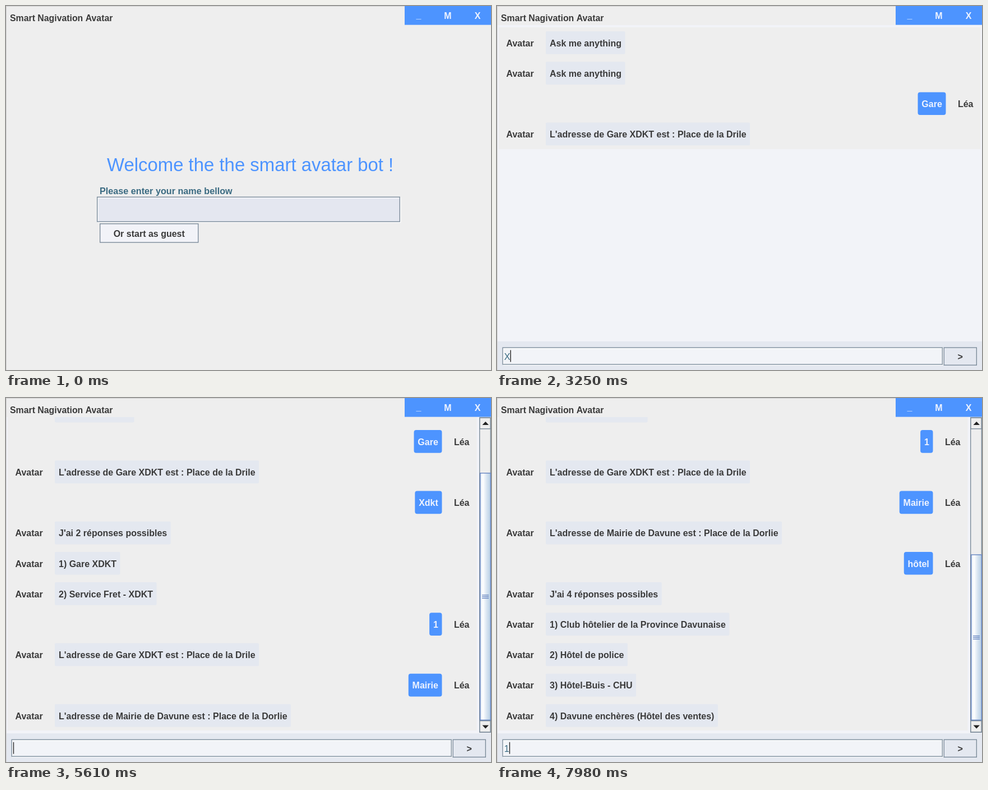
These frames come from a looping animation (865x648 px, 8 s). An HTML page with a canvas:

```html
<!DOCTYPE html>
<html lang="fr">
<head>
<meta charset="utf-8">
<title>Smart Nagivation Avatar</title>
<style>
  html, body { margin: 0; width: 100%; height: 100%; overflow: hidden; background: #eee; }
  canvas { display: block; }
</style>
</head>
<body>
<canvas id="stage" width="865" height="648"></canvas>
<script>
const ctx = document.getElementById('stage').getContext('2d');
const LOOP = 8000, ROW = 54.2, PX = 1.36;
const FONT = '"Liberation Sans", Arial, sans-serif';
const BOLD = 'bold 16px ' + FONT, PLAIN = '16.26px ' + FONT;
const BLUE = '#4d94ff', GREY = '#eee', PALE = '#f2f3f8', MIST = '#e4e8f0';
const EDGE = '#7a8a99', INK = '#3a3a3a', TEAL = '#3b6b82';

const USER = 'Léa';
const STATION = "L'adresse de Gare XDKT est : Place de la Drile";
// A leading ">" marks a message written by the user.
const chat = [
  'Ask me anything', 'Ask me anything',
  '>Gare', STATION,
  '>Xdkt', "J'ai 2 réponses possibles", '1) Gare XDKT', '2) Service Fret - XDKT',
  '>1', STATION,
  '>Mairie', "L'adresse de Mairie de Davune est : Place de la Dorlie",
  '>hôtel', "J'ai 4 réponses possibles",
  '1) Club hôtelier de la Province Davunaise', '2) Hôtel de police',
  '3) Hôtel-Buis - CHU', '4) Davune enchères (Hôtel des ventes)'
];

// Number of visible messages from each time on; 0 is the welcome screen.
const counts = { 0: 0, 820: 2, 2270: 4, 3530: 8, 4750: 10, 5610: 12, 6500: 18 };

// Content of the active field; "|" is the visible caret.
const typing = {
  0: '', 430: '|', 540: '', 600: '|', 650: 'L|', 710: 'Lé|', 760: 'Léa|',
  820: '', 1280: '|', 1410: '', 1550: '|', 1660: '', 1800: '|', 1910: '',
  1960: 'G|', 2020: 'Ga|', 2080: 'Gar|', 2190: 'Gare|',
  2270: '|', 2380: '', 2520: '|', 2660: '', 2770: '|', 2910: '',
  2970: 'X|', 3110: 'X', 3250: 'X|', 3310: 'Xd|', 3370: 'Xdk|', 3420: 'Xdkt|',
  3530: '|', 3670: '', 3780: '|', 3950: '', 4060: '|', 4200: '', 4310: '|',
  4450: '', 4560: '|', 4640: '1|',
  4750: '|', 4890: '', 5000: '|', 5140: '', 5200: '|',
  5250: 'M|', 5310: 'Ma|', 5360: 'Mai|', 5420: 'Mair|', 5470: 'Mairi|', 5530: 'Mairie|',
  5610: '|', 5720: '', 5860: '|', 5970: '',
  6030: 'h|', 6090: 'hô|', 6140: 'hôt|', 6200: 'hôte|', 6280: 'hôtel|', 6420: 'hôtel',
  6500: '|', 6620: '', 6750: '|', 6870: '', 6980: '|', 7090: '', 7230: '|',
  7340: '', 7480: '|', 7590: '', 7730: '|', 7870: '', 7980: '1|'
};

function at(track, t) {
  let value;
  for (const key in track) if (+key <= t) value = track[key];
  return value;
}

function fill(x, y, w, h, color) {
  ctx.fillStyle = color;
  ctx.fillRect(x, y, w, h);
}

function frame(x, y, w, h, color) {
  ctx.strokeStyle = color;
  ctx.lineWidth = PX;
  ctx.strokeRect(x + PX / 2, y + PX / 2, w - PX, h - PX);
}

function round(x, y, w, h, r, color) {
  ctx.fillStyle = color;
  ctx.beginPath();
  ctx.roundRect(x, y, w, h, r);
  ctx.fill();
}

function text(str, x, y, color = INK, font = BOLD, align = 'left') {
  ctx.font = font;
  ctx.fillStyle = color;
  ctx.textAlign = align;
  ctx.fillText(str, x, y);
}

function field(x, y, w, h, color, value, inset) {
  fill(x, y, w, h, color);
  frame(x + PX, y + PX, w, h, '#fff');
  frame(x, y, w, h, EDGE);
  const str = value.replace('|', ''), mid = y + h / 2;
  text(str, x + inset, mid + 6.6, TEAL, PLAIN);
  if (str !== value) fill(x + inset + ctx.measureText(str).width, mid - 10.5, PX, 21, '#222');
}

function button(label, x, y, w, h, color) {
  fill(x, y, w, h, color);
  frame(x, y, w, h, EDGE);
  text(label, x + w / 2, y + h / 2 + 6.3, INK, BOLD, 'center');
}

function titleBar() {
  fill(0, 0, 865, 34, GREY);
  fill(0, 0, 865, 1, '#cfcfcf');
  fill(0, 0, 1, 648, '#cfcfcf');
  text('Smart Nagivation Avatar', 7, 27, INK, 'bold 15.85px ' + FONT);
  fill(711, 0, 154, 33.6, BLUE);
  text('_', 736, 22, '#eef3ff', BOLD, 'center');
  text('M', 788, 23, '#eef3ff', BOLD, 'center');
  text('X', 841, 23, '#eef3ff', BOLD, 'center');
}

function welcome(value, t) {
  fill(0, 0, 865, 648, GREY);
  text('Welcome the the smart avatar bot !', 180, 294, BLUE, '32.9px ' + FONT);
  text('Please enter your name bellow', 167, 335, TEAL, 'bold 16.2px ' + FONT);
  field(162, 339.5, 541, 45, '#e4e7f0', value, 2.5);
  button('Or start as guest', 167, 387, 176.5, 34.5, PALE);
  if (t >= 130 && t < 290) frame(168.4, 388.4, 173.7, 31.7, '#b8cfe5');
}

function arrow(y, dir) {
  ctx.fillStyle = '#222';
  ctx.beginPath();
  ctx.moveTo(849.5, y - 3 * dir);
  ctx.lineTo(861, y - 3 * dir);
  ctx.lineTo(855.2, y + 3 * dir);
  ctx.fill();
}

function scrollbar(n) {
  fill(844, 34, 21, 562, GREY);
  frame(844, 34.5, 21, 561, EDGE);
  frame(844, 34.5, 21, 21, EDGE);
  frame(844, 574, 21, 21.5, EDGE);
  arrow(45, -1);
  arrow(585.5, 1);
  const h = 518 * 563 / (ROW * n + 11), y = 574 - h;
  const shade = ctx.createLinearGradient(845, 0, 864, 0);
  shade.addColorStop(0, '#dde8f3');
  shade.addColorStop(.3, '#fff');
  shade.addColorStop(.6, '#dde8f3');
  shade.addColorStop(1, '#b8cfe5');
  fill(845, y, 20, h, shade);
  frame(845, y, 20, h, '#6382bf');
  for (let i = -1; i < 2; i++) fill(849, y + h / 2 - .5 + i * 2.8, 12, 1.3, '#6382bf');
}

function message(entry, y, right) {
  ctx.font = BOLD;
  if (entry[0] === '>') {
    const str = entry.slice(1), w = ctx.measureText(str).width + 13.5;
    round(right - 62 - w, y, w, 40.7, 4, BLUE);
    text(str, right - 62 - w + 6.8, y + 26.7, '#eef3ff');
    text(USER, right - 13, y + 26.7, INK, BOLD, 'right');
  } else {
    round(87, y, ctx.measureText(entry).width + 13.5, 40.7, 2, MIST);
    text('Avatar', 16.5, y + 26.7);
    text(entry, 94, y + 26.7);
  }
}

function conversation(n, value) {
  const scroll = Math.max(0, ROW * n - 554.1), right = scroll ? 839.5 : 862.5;
  fill(0, 0, 865, 648, PALE);
  ctx.save();
  ctx.beginPath();
  ctx.rect(0, 34, 865, 563);
  ctx.clip();
  fill(3, 38 - scroll, right - 3, ROW * n, GREY);
  for (let i = 0; i < n; i++) message(chat[i], 45 + ROW * i - scroll, right);
  ctx.restore();
  if (scroll) scrollbar(n);
  fill(0, 597, 865, 51, MIST);
  field(9.5, 607.5, 785.5, 31.2, '#f2f4f8', value, 3.3);
  button('>', 796.5, 607.5, 59.5, 32.5, MIST);
}

function draw(t) {
  const n = at(counts, t), value = at(typing, t);
  if (n) conversation(n, value);
  else welcome(value, t);
  titleBar();
}

function tick() {
  draw(performance.now() % LOOP);
  requestAnimationFrame(tick);
}
tick();
</script>
</body>
</html>
```
